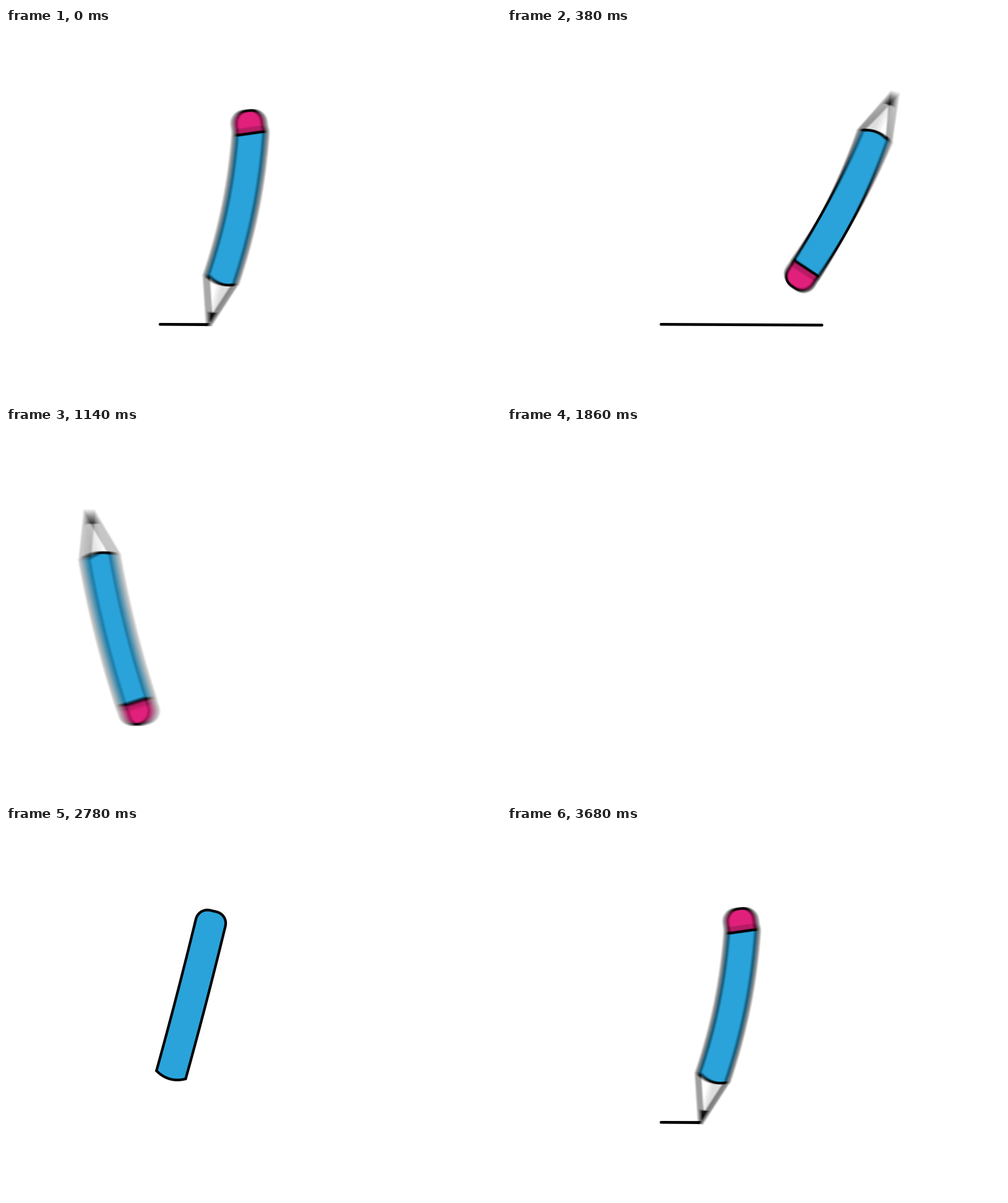
Animation of 800 by 600 pixels, one loop 3700 ms. Source, as an HTML page with a canvas:

```html
<!DOCTYPE html>
<html>
<head>
<meta charset="utf-8">
<title>Pencil</title>
<style>
html, body { margin: 0; width: 100%; height: 100%; overflow: hidden; background: #fff; }
canvas { display: block; }
</style>
</head>
<body>
<canvas id="stage" width="800" height="600"></canvas>
<script>
const LOOP = 3700, STEP = 20, SHUTTER = 0.7, SAMPLES = 16;
const GONE = 1340, BORN = 1860;
const LENGTH = 274, HALF = 24.5, RAD = Math.PI / 180;
const LINE = { left: 249, right: 509, y: 479.3 };

const stage = document.getElementById('stage').getContext('2d');
const layer = document.createElement('canvas');
layer.width = 800;
layer.height = 600;
const g = layer.getContext('2d');

const ramp = (t, from, to) => Math.min(1, Math.max(0, (t - from) / (to - from)));
const smooth = (t, from, to) => {
  const p = ramp(t, from, to);
  return p * p * (3 - 2 * p);
};
const easeOut = (t, from, to) => 1 - (1 - ramp(t, from, to)) ** 2;

// Exponential growth up to full size, then a short damped bounce.
function growth(t) {
  const d = t - 2542;
  return d < 0 ? Math.exp(d / 114) : 1 + 0.25 * Math.exp(-d / 60) * Math.sin(d / 40);
}

// Accelerates for 300 ms, then keeps its speed.
function slide(t) {
  const d = Math.max(0, t - 4500), a = Math.min(d, 300);
  return 0.00232 * a * (2 * d - a);
}

// Time runs from the birth of the pencil to its exit, past the loop point.
function poseAt(t) {
  const spin = smooth(t, 2440, 2760);
  const swing = 2 * smooth(t, 3200, 3500) - smooth(t, 2900, 3160);
  const draw = ramp(t, 3500, 3864) ** 2;
  const flip = easeOut(t, 3870, 4120);
  const land = smooth(t, 4040, 4400);
  const long = growth(t);
  return {
    x: 301 - 8 * swing + 262 * draw - 105 * smooth(t, 3864, 4540) - slide(t),
    y: 270 + 2 * swing + 71 * smooth(t, 3820, 4500),
    angle: 58 - 43.5 * spin - 4.1 * swing - 165 * flip - 40 * land,
    bend: 2 * spin + 15 * swing - 33 * flip + 25 * land,
    twist: (-5 - 7 * swing) * (1 - flip),
    long,
    wide: Math.min(1, 1.3 * long),
    lift: 80 * (1 - smooth(t, 2980, 3370)),
    cap: easeOut(t, 2820, 2960),
    tip: -80 * (1 - easeOut(t, 3250, 3450))
  };
}

function paint(fill, stroke) {
  if (fill) { g.fillStyle = fill; g.fill(); }
  if (stroke) { g.strokeStyle = '#000'; g.stroke(); }
}

function polygon(points) {
  g.beginPath();
  points.forEach(p => g.lineTo(p[0], p[1]));
  g.closePath();
}

// Centre line of the bent body: s runs from -0.5 (base) to 0.5 (top).
function spine(pose, s) {
  const len = LENGTH * pose.long, bend = pose.bend * RAD;
  return { x: len * bend / 8 * (1 - 4 * s * s), y: -len * s, lean: -bend * s };
}

function drawBody(pose) {
  const half = HALF * pose.wide, r = 19 * pose.wide;
  const len = LENGTH * pose.long;
  const end = pose.lift < 6 ? len - 12 : len;
  const points = [];
  const add = (u, v) => {
    const c = spine(pose, v / len - 0.5);
    points.push([c.x + u * Math.cos(c.lean), c.y + u * Math.sin(c.lean)]);
  };
  const corner = (side, i) => {
    const a = i / 8 * Math.PI / 2;
    add(side * (half - r + r * Math.cos(a)), end - r + r * Math.sin(a));
  };
  for (let i = 0; i <= 16; i++) add(-half, (end - r) * i / 16);
  for (let i = 1; i <= 8; i++) corner(-1, i);
  for (let i = 8; i >= 1; i--) corner(1, i);
  for (let i = 16; i >= 0; i--) add(half, (end - r) * i / 16);
  for (let i = 1; i < 10; i++) {
    const k = 1 - i / 5;
    add(half * k, -7 * pose.wide * (1 - k * k));
  }
  polygon(points);
  paint('#2aa3da', true);
}

function drawTip(pose) {
  const c = spine(pose, -0.5), length = 74, lead = 21;
  const w = HALF * lead / length;
  const cone = () => polygon([[-HALF, 0], [0, length], [HALF, 0]]);
  g.save();
  g.translate(c.x, c.y);
  g.rotate(c.lean - 0.25 * pose.bend * RAD);
  g.translate(0, pose.tip);
  cone();
  paint('#fff');
  polygon([[0, 0], [0, length], [HALF, 0]]);
  paint('#dedede');
  polygon([[-w, length - lead], [0, length - lead + 3], [w, length - lead], [0, length]]);
  paint('#222');
  cone();
  g.lineWidth = 3.6;
  paint(null, true);
  g.restore();
}

function drawEraser(pose) {
  const c = spine(pose, 0.5 - 33 / LENGTH), w = 24, h = 37, r = 20;
  g.save();
  g.translate(c.x, c.y);
  g.rotate(c.lean + pose.twist * RAD);
  g.translate(0, -pose.lift);
  g.scale(pose.cap, pose.cap);
  g.beginPath();
  g.moveTo(-w, 0);
  g.arcTo(-w, -h, 0, -h, r);
  g.arcTo(w, -h, w, 0, r);
  g.lineTo(w, 0);
  g.closePath();
  paint('#e1207c');
  g.fillStyle = '#b51c64';
  g.fillRect(-w, -10, 2 * w, 10);
  paint(null, true);
  g.restore();
}

function drawLine(pose, t) {
  if (t < 3500) return;
  let end = LINE.right;
  if (t < 3864) end = Math.min(end, pose.x - 45);
  if (t > 4480) end = Math.min(end, pose.x + 34);
  if (end <= LINE.left) return;
  g.lineWidth = 4.6;
  g.lineCap = 'round';
  g.beginPath();
  g.moveTo(LINE.left, LINE.y);
  g.lineTo(end, LINE.y + (end - LINE.left) / 217);
  paint(null, true);
}

function drawScene(t) {
  g.fillStyle = '#fff';
  g.fillRect(0, 0, 800, 600);
  const pose = poseAt(t);
  drawLine(pose, t);
  g.save();
  g.translate(pose.x, pose.y);
  g.rotate(pose.angle * RAD);
  g.lineJoin = 'miter';
  g.miterLimit = 4;
  if (pose.tip > -80) drawTip(pose);
  g.lineWidth = 4.2 * Math.min(1, pose.wide * 1.5);
  drawBody(pose);
  g.lineWidth = 4.2;
  if (pose.cap > 0) drawEraser(pose);
  g.restore();
}

// Averages several instants inside the shutter window for motion blur.
function render(time) {
  stage.globalAlpha = 1;
  stage.fillStyle = '#fff';
  stage.fillRect(0, 0, 800, 600);
  if (time >= GONE && time < BORN) return;
  const t = time < GONE ? time + LOOP : time;
  for (let i = 0; i < SAMPLES; i++) {
    drawScene(t + STEP * SHUTTER * ((i + 0.5) / SAMPLES - 0.5));
    stage.globalAlpha = 1 / (i + 1);
    stage.drawImage(layer, 0, 0);
  }
}

const start = performance.now();
let shown = -1;
function tick() {
  const time = Math.floor((performance.now() - start) % LOOP / STEP) * STEP;
  if (time !== shown) render(shown = time);
  requestAnimationFrame(tick);
}
tick();
</script>
</body>
</html>
```
